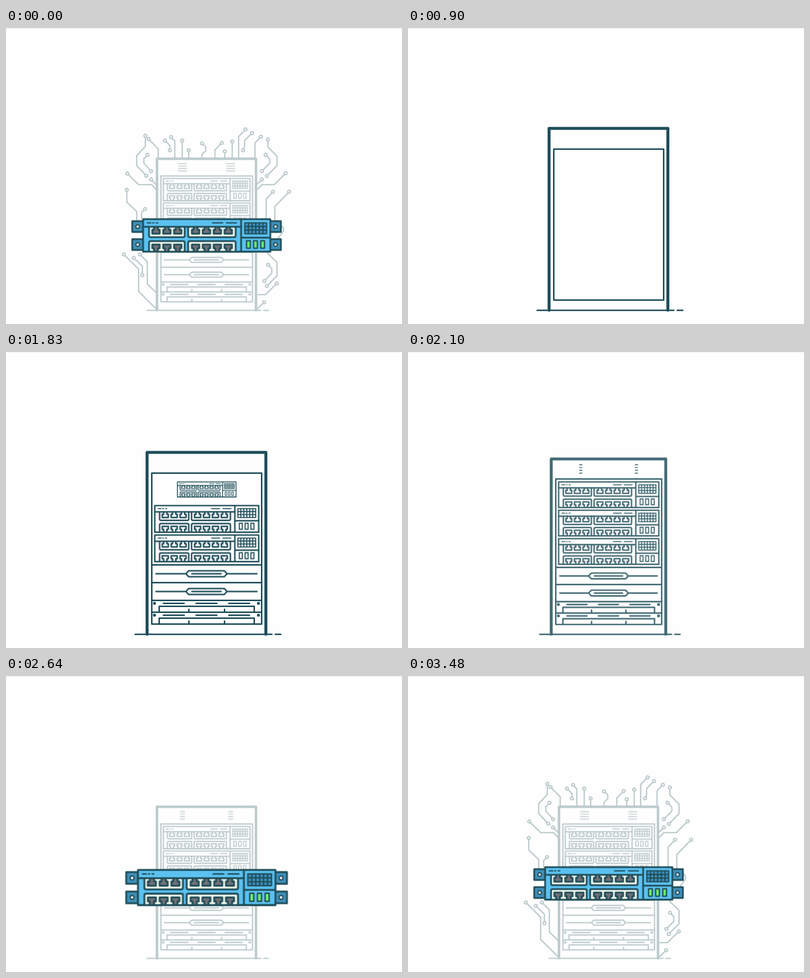
These frames come from a looping animation (800x600 px, 5480 ms). An HTML page without scripts:

```html
<!DOCTYPE html>
<html lang="en">
<head>
<meta charset="utf-8">
<title>Server rack</title>
<style>
html, body { margin: 0; width: 100%; height: 100%; overflow: hidden; background: #fefefe; }
svg { display: block; width: 100vw; height: 100vh; }

/* Starts 30 ms before the loop wraps, on the finished picture */
.a { animation: 5480ms ease-out -5450ms infinite; }

.rack, .unit { fill: none; stroke: #1f4e5a; stroke-width: 3; stroke-linecap: round; stroke-linejoin: round; }
.rack { animation-name: recede; animation-timing-function: ease-in-out; transform-origin: 405px 572px; }
.floor { animation-name: floor; animation-timing-function: ease-in-out; transform-origin: 399px 572px; }
.dash { animation-name: dash; transform-origin: 543px 572px; }
.posts { stroke-width: 6; animation-name: posts; transform-origin: 405px 572px; }
.inner { animation-name: inner; transform-origin: 405px 551.5px; }
.row1 { animation-name: row1; transform-origin: 405px 551.5px; }
.row2 { animation-name: row2; transform-origin: 405px 551.5px; }
.sep1 { animation-name: sep1; transform-origin: 405px 0; }
.sep2 { animation-name: sep2; transform-origin: 405px 0; }
.grip1 { animation-name: grip1; }
.grip2 { animation-name: grip2; }
.sw1 { animation-name: sw1; }
.sw2 { animation-name: sw2; }
.sw3 { animation-name: sw3; }
.vent { stroke-width: 2; animation-name: vent; animation-timing-function: linear; }
.dot { stroke-width: 6; }
.fine { stroke-width: 2.7; }

.unit {
  stroke-width: 3.5;
  --body: #5bc1f0; --panel: #eef5ea; --port: #747177; --cell: #3f94c1; --led: #6bf76b;
  animation-name: pop;
}
.body { fill: var(--body, none); }
.panel { fill: var(--panel, none); }
.port { fill: var(--port, none); }
.cell { fill: var(--cell, none); }
.led { fill: var(--led, none); }
.ear { fill: #3f90b9; }
.hole { fill: #fefefe; stroke-width: 2.6; }

.wires { fill: none; stroke: #bccacc; stroke-width: 2.6; stroke-linejoin: round;
  stroke-dasharray: 1 1; animation-name: wires; animation-timing-function: linear; }
.nodes { fill: none; stroke: none; animation-name: nodes; }
.nodes path { marker-start: url(#node); }
.nodes .both path, .nodes .both { marker-end: url(#node); }
.nodes { marker-start: url(#node); }

@keyframes floor { 0% { transform: scaleX(0) } 8.2%, to { transform: none } }
@keyframes dash { 0%, 8.2% { transform: scaleX(0) } 9.3%, to { transform: none } }
@keyframes posts {
  0%, 9.9% { transform: scaleY(0) }
  13% { transform: scaleY(1.034) }
  14.2% { transform: scaleY(.99) }
  15.3%, to { transform: none }
}
@keyframes inner { 0%, 12% { transform: scaleY(0) } 15.9%, to { transform: none } }
@keyframes row1 { 0%, 18.1% { transform: scaleY(0) } 20.2%, to { transform: none } }
@keyframes row2 { 0%, 20.2% { transform: scaleY(0) } 22.4%, to { transform: none } }
@keyframes sep1 { 0%, 22.4% { transform: scaleX(0) } 23.7%, to { transform: none } }
@keyframes sep2 { 0%, 23.7% { transform: scaleX(0) } 25%, to { transform: none } }
@keyframes grip1 { 0%, 24.9% { transform: scaleX(0) } 27.4%, to { transform: none } }
@keyframes grip2 { 0%, 26.3% { transform: scaleX(0) } 28.5%, to { transform: none } }
@keyframes sw3 { 0%, 27.4% { transform: scale(0) } 30.1%, to { transform: none } }
@keyframes sw2 { 0%, 29.6% { transform: scale(0) } 32.3%, to { transform: none } }
@keyframes sw1 { 0%, 31.8% { transform: scale(0) } 34.5%, to { transform: none } }
@keyframes vent {
  0%, 35.6% { transform: scaleX(0) }
  37.8% { transform: scaleX(.3) }
  47.6% { transform: scaleX(.56) }
  61.5%, to { transform: none }
}
@keyframes recede {
  0%, 35.6% { transform: scale(1); stroke: #1f4e5a }
  42.4%, to { transform: scale(.8333); stroke: #bccacc }
}
@keyframes pop {
  0%, 42.2% { transform: translate(405.5px, 426.6px) scale(.681); opacity: 0 }
  42.8% { opacity: 1 }
  44.9% { transform: translate(405.5px, 431px) scale(1.209); animation-timing-function: linear }
  47.6% { transform: translate(405.5px, 429px) scale(1.083) }
  50.4%, to { transform: translate(405.5px, 420.5px) scale(1); opacity: 1 }
}
@keyframes wires {
  0%, 50.9% { stroke-dashoffset: -1; opacity: 0 }
  51%  { opacity: 1 }
  62.4%, to { stroke-dashoffset: 0; opacity: 1 }
}
@keyframes nodes { 0%, 60.8% { opacity: 0 } 63%, to { opacity: 1 } }
</style>
</head>
<body>
<svg viewBox="0 0 800 600">
  <defs>
    <marker id="node" markerUnits="userSpaceOnUse" markerWidth="10" markerHeight="10" refX="5" refY="5">
      <circle cx="5" cy="5" r="3" fill="#fefefe" stroke="#bccacc" stroke-width="2.5"/>
    </marker>

    <path id="top-port" d="M-4-17.5V-11.5H-7.5V-3.5H7.5V-11.5H4V-17.5"/>
    <path id="low-port" d="M-4 33V26H-7.5V18.5H7.5V26H4V33"/>
    <g id="port" class="port"><use href="#top-port"/><use href="#low-port"/></g>
    <g id="trio">
      <use href="#port" x="-22"/><use href="#port"/><use href="#port" x="22"/>
    </g>

    <g id="switch">
      <path class="body" d="M-128.5-33H128.5V33H-128.5Z"/>
      <path class="panel" d="M-116.5-17.5V.5q0 3 3 3h66q3 0 3-3V-17.5M-37.5-17.5V.5q0 3 3 3h90q3 0 3-3V-17.5
        M-116.5 33V14.5q0-3 3-3h66q3 0 3 3V33M-37.5 33V14.5q0-3 3-3h90q3 0 3 3V33"/>
      <use href="#trio" x="-80.5"/>
      <use href="#trio" x="-.5"/>
      <use href="#port" x="43.5"/>
      <path d="M-128.5-17.5H69.5M69.5-33V33M69.5 4.5H128.5M-128.5 33H128.5"/>
      <path class="fine" d="M-120-25.5h7M-109-25.5h2M-102-25.5h3M12-25.5h20M40-25.5h20"/>
      <path class="cell fine" d="M77-25.5H121V-3.5H77Z"/>
      <path class="fine" d="M77-18.2H121M77-10.8H121M84.3-25.5v22m7.4-22v22m7.3-22v22m7.3-22v22m7.4-22v22"/>
      <path class="led fine" d="M80.5 10.8h7.5v15h-7.5ZM94.8 10.8h7.5v15h-7.5ZM109.2 10.8h7.5v15h-7.5Z"/>
    </g>

    <g id="ear">
      <path class="ear" d="M-11-11H11V11H-11Z"/>
      <circle class="hole" r="3.7"/>
    </g>

    <g id="tray">
      <path d="M294.5 527.5H516.5M318 533.5h42M384 533.5h42M450 533.5h42M309.5 551V539.5H501.5V551M369.5 545.5V551M441.5 545.5V551"/>
      <path class="dot" d="M300 533.5h.01M510 533.5h.01"/>
    </g>
    <path id="grip" d="M-102 0H-41.5L-36-6H36L41.5 0 36 6H-36L-41.5 0M41.5 0H102M-29.5 0H29.5"/>
    <path id="vent" d="M-10 0H10M-10 5.9H10M-10 11.8H10M-10 17.7H10"/>

    <g id="single">
      <path pathLength="1" d="M288 225L307.5 245V263"/>
      <path pathLength="1" d="M293 307L304 318"/>
      <path pathLength="1" d="M245 295L268 317.5H294L304 328"/>
      <path pathLength="1" d="M244 328V353L264 372V390"/>
      <path pathLength="1" d="M281 367L274 374V388"/>
      <path pathLength="1" d="M238 459L268 489V534L304 570"/>
      <path pathLength="1" d="M270.5 459L285.5 474V519L304 537"/>
      <path pathLength="1" d="M333.5 221L341 229V263"/>
      <path pathLength="1" d="M356 228V263"/>
      <path pathLength="1" d="M369 248V263"/>
      <path pathLength="1" d="M396 234L403.5 241V249L396 256V263"/>
      <path pathLength="1" d="M436 233L422 247V263"/>
      <path pathLength="1" d="M442 250V263"/>
      <path pathLength="1" d="M457 230V263"/>
      <path pathLength="1" d="M484 205.5L470 220V263"/>
      <path pathLength="1" d="M515 220.5L503 233V263"/>
      <path pathLength="1" d="M517 307L507 317"/>
      <path pathLength="1" d="M565 294.5L542 317.5H517L507 328"/>
      <path pathLength="1" d="M539.5 332L525.5 347V388"/>
      <path pathLength="1" d="M572 332L543 362V390"/>
      <path pathLength="1" d="M527 523L547.5 502V475L529 457V450"/>
      <path pathLength="1" d="M547 518L524 540.5H508"/>
      <path pathLength="1" d="M521.5 556L507 570"/>
      <path pathLength="1" d="M545 432L560.5 412V405L545 390"/>
    </g>
    <g id="double">
      <path pathLength="1" d="M281.5 218.5V240L264 259V279L283.5 299.5"/>
      <path pathLength="1" d="M286 257L278.5 265V274L293 290"/>
      <path pathLength="1" d="M258 466L275.5 483V501"/>
      <path pathLength="1" d="M321 228L331 238V248"/>
      <path pathLength="1" d="M497 213L482 228V240L479 248"/>
      <path pathLength="1" d="M529 226V241L547.5 260V279L527 300"/>
      <path pathLength="1" d="M524.5 257L533 266V274L517 290"/>
      <path pathLength="1" d="M529.5 480L537 488V497L522 513"/>
    </g>
  </defs>

  <path d="M0 .5H800" stroke="#ececec"/>

  <g class="a wires"><use href="#single"/><use href="#double"/></g>
  <g class="a nodes"><use href="#single"/><use class="both" href="#double"/></g>

  <g class="a rack">
    <path class="a floor" d="M261 572.3H537"/>
    <path class="a dash" d="M544 572.3H555"/>
    <path class="a posts" d="M285 572V203.5H525V572"/>
    <path class="a inner" d="M294.5 245.5H516.5V551.5H294.5Z"/>
    <g class="a row1"><use href="#tray"/></g>
    <g transform="translate(0 -24)"><g class="a row2"><use href="#tray"/></g></g>
    <path class="a sep1" d="M294.5 467.5H516.5"/>
    <path class="a sep2" d="M294.5 431.5H516.5"/>
    <g transform="translate(405 485.5)"><use class="a grip1" href="#grip"/></g>
    <g transform="translate(405 449.5)"><use class="a grip2" href="#grip"/></g>
    <g stroke-width="3.6">
      <g transform="translate(405.5 398) scale(.817)"><use class="a sw3" href="#switch"/></g>
      <g transform="translate(405.5 338.3) scale(.817)"><use class="a sw2" href="#switch"/></g>
      <g transform="translate(405.5 278.6) scale(.817)"><use class="a sw1" href="#switch"/></g>
    </g>
    <g transform="translate(347 215.6)"><use class="a vent" href="#vent"/></g>
    <g transform="translate(463.7 215.6)"><use class="a vent" href="#vent"/></g>
  </g>

  <g class="a unit">
    <use href="#ear" x="-139.5" y="-18"/><use href="#ear" x="-139.5" y="18.5"/>
    <use href="#ear" x="139" y="-18"/><use href="#ear" x="139" y="18.5"/>
    <use href="#switch"/>
  </g>
</svg>
</body>
</html>
```
